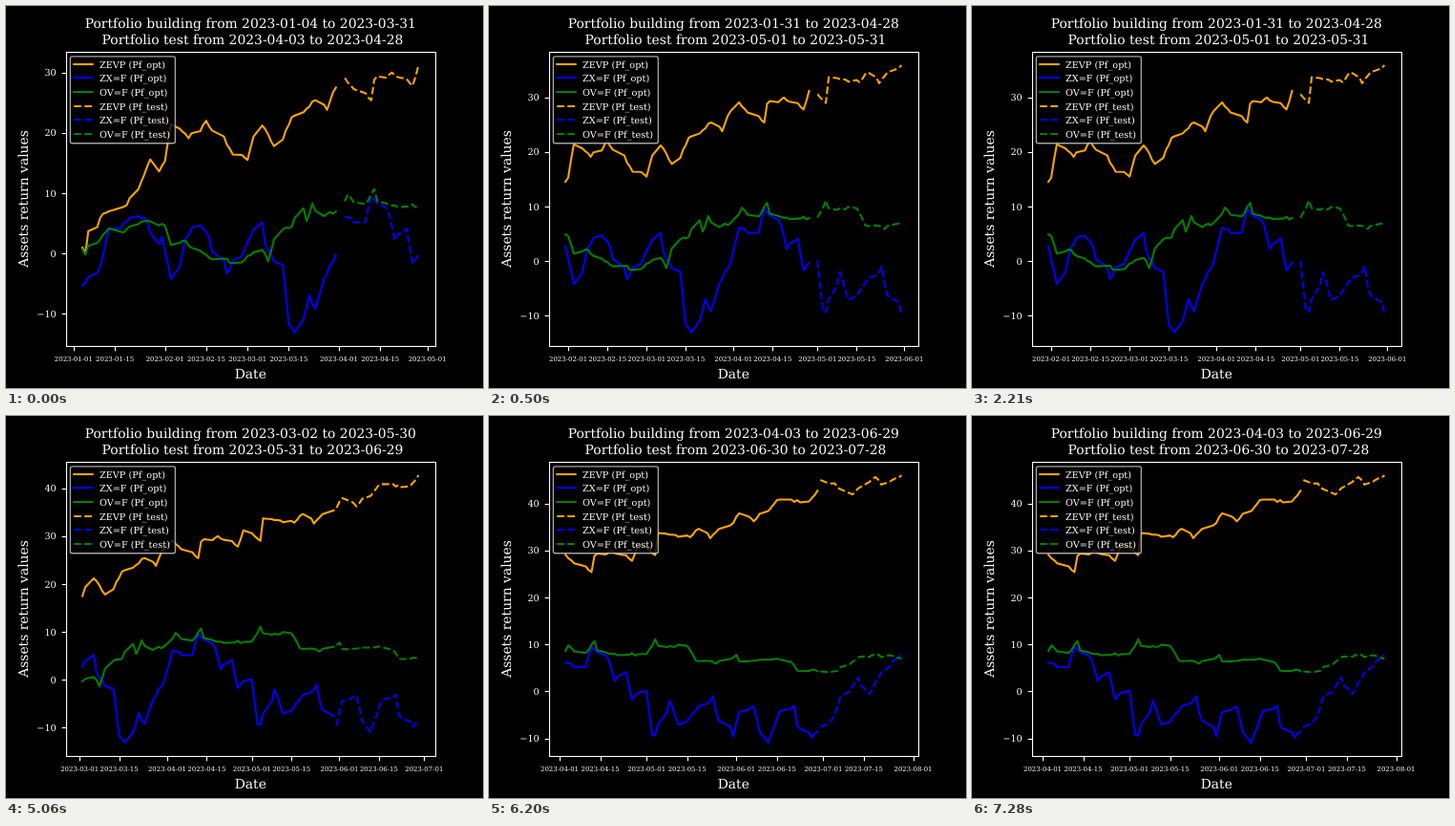
Animation of 500 by 400 pixels, one loop 8 s. Source, as an HTML page:

```html
<!DOCTYPE html>
<html lang="en">
<head>
<meta charset="utf-8">
<title>Portfolio windows</title>
<style>
  html, body { margin: 0; width: 100%; height: 100%; overflow: hidden; background: #000; }
  svg { display: block; width: 500px; height: 400px; }
  text { fill: #fff; font-family: 'DejaVu Serif', 'Noto Serif', serif; white-space: pre; text-rendering: geometricPrecision; }
</style>
</head>
<body>
<svg id="stage" viewBox="0 0 500 400"></svg>
<script>
const DAY = 86400000;
const LOOP = 8000;
const BOX = { left: 62.5, right: 450, top: 48, bottom: 356 };
const CLOSED = ['2023-01-16', '2023-02-20', '2023-04-07', '2023-05-29', '2023-06-19', '2023-07-04'];

// Turning points: [trading day, return in percent]
const ASSETS = [
  { name: 'ZEVP', color: '#ffa500', turns: [
    [0, 1], [1, 0], [2, 3.7], [5, 6.6], [10, 8], [16, 15.6], [17, 13.6], [19, 15.3], [21, 21.4], [25, 19.1],
    [29, 22], [35, 16.4], [38, 15.5], [41, 21.2], [45, 17.8], [49, 22.6], [55, 25.4], [57, 23.8], [61, 29.1],
    [67, 25.4], [68, 28.8], [72, 30], [77, 27.8], [79, 31.2], [83, 29], [84, 33.7], [91, 32.8], [94, 34.6],
    [96, 32.6], [101, 35.9], [103, 37.9], [106, 36.2], [112, 40.7], [118, 40.4], [121, 42.7], [122, 45],
    [128, 41.9], [134, 45.6], [136, 44], [141, 46]] },
  { name: 'ZX=F', color: '#0000ff', turns: [
    [0, -5.3], [4, -2.2], [7, 4], [12, 6.2], [15, 5.5], [17, 1.6], [18, 2.8], [21, -4.2], [24, 2.6], [27, 4.7],
    [30, 2.6], [33, -3.3], [36, -.5], [41, 5.2], [42, 1.6], [46, -1.9], [48, -11.7], [50, -13.1], [53, -6.9],
    [55, -9.2], [56, -4.1], [60, -.2], [61, 6.1], [65, 5.2], [67, 9.5], [71, 6.6], [73, 2.2], [75, 4.1],
    [77, -1.7], [80, .1], [82, -9.3], [83, -9.3], [86, -2], [89, -7.1], [97, -1], [98, -4.4], [101, -9.6],
    [103, -4.4], [106, -3.3], [109, -10.9], [113, -4.2], [115, -3.1], [116, -7.3], [119, -9.8], [123, -6.8],
    [126, -1.1], [130, 3], [132, -.6], [138, 6.5], [141, 7.7]] },
  { name: 'OV=F', color: '#008000', turns: [
    [0, .7], [1, -.2], [2, 1.3], [7, 4.2], [9, 3.5], [14, 5.4], [19, 4.6], [21, 1.4], [24, 2.1], [29, -.2],
    [35, -1.6], [41, .6], [43, -1.3], [46, 4], [49, 4.4], [51, 7.5], [52, 5.4], [54, 8.3], [56, 6.2],
    [60, 7], [62, 9.8], [65, 8.2], [68, 10.7], [69, 8.7], [74, 7.7], [80, 8], [83, 11.1], [84, 9.7],
    [90, 9.7], [93, 6.6], [98, 5.9], [102, 7.8], [103, 6.4], [113, 6.8], [116, 4.4], [121, 4.3],
    [125, 4.4], [129, 6.7], [133, 7.8], [139, 7.3], [141, 6.9]] }
];

const WINDOWS = [
  { at: 0, from: '2023-01-04', split: '2023-04-03', to: '2023-04-28' },
  { at: 500, from: '2023-01-31', split: '2023-05-01', to: '2023-05-31' },
  { at: 3350, from: '2023-03-02', split: '2023-05-31', to: '2023-06-29' },
  { at: 6200, from: '2023-04-03', split: '2023-06-30', to: '2023-07-28' }
];

const iso = ms => new Date(ms).toISOString().slice(0, 10);

function tradingDays(first, last) {
  const days = [];
  for (let d = Date.parse(first); d <= Date.parse(last); d += DAY) {
    const weekday = new Date(d).getUTCDay();
    if (weekday % 6 && !CLOSED.includes(iso(d))) days.push(iso(d));
  }
  return days;
}

let seed = 7;
const random = () => (seed = seed * 16807 % 2147483647) / 2147483647;

// Straight runs between turning points, with a little daily noise
function walk(turns) {
  const out = [turns[0][1]];
  for (let k = 1; k < turns.length; k++) {
    const [a, va] = turns[k - 1], [b, vb] = turns[k];
    for (let i = a + 1; i < b; i++) out.push(va + (vb - va) * (i - a) / (b - a) + (random() - .5) * .6);
    out.push(vb);
  }
  return out;
}

const days = tradingDays('2023-01-04', '2023-07-28');
ASSETS.forEach(a => a.returns = walk(a.turns));

const text = (s, x, y, size, anchor = 'middle', extra = '') =>
  `<text x="${x}" y="${y}" font-size="${size}" text-anchor="${anchor}" ${extra}>${s}</text>`;

const line = (d, color, dashed) =>
  `<path d="${d}" fill="none" stroke="${color}" stroke-width="2.08" stroke-linejoin="round" ` +
  (dashed ? 'stroke-dasharray="7.71 3.33"/>' : 'stroke-linecap="square"/>');

const tick = d => `<path d="${d}" stroke="#fff" stroke-width="1.11"/>`;

function legend() {
  let out = '<rect x="67.4" y="52.9" width="110" height="90.8" rx="2" fill="#000" fill-opacity=".8" ' +
    'stroke="#ccc" stroke-opacity=".8" stroke-width="1.39"/>';
  ['opt', 'test'].forEach((part, p) => ASSETS.forEach((a, i) => {
    const y = 60.6 + 14.65 * (p * 3 + i);
    out += line(`M71.2 ${Math.round(y)}H90.7`, a.color, p) +
      text(`${a.name} (Pf_${part})`, 98, Math.round(y + 4), 9.72, 'start');
  }));
  return out;
}

function chart({ from, split, to }) {
  const [i0, i1, i2] = [from, split, to].map(d => days.indexOf(d));
  const values = ASSETS.flatMap(a => a.returns.slice(i0, i2 + 1));
  const min = Math.min(...values), max = Math.max(...values);
  const t0 = Date.parse(from), t1 = Date.parse(to);
  const padX = (BOX.right - BOX.left) / 22, padY = (BOX.bottom - BOX.top) / 22;
  const px = t => BOX.left + padX + (t - t0) / (t1 - t0) * padX * 20;
  const py = v => BOX.bottom - padY - (v - min) / (max - min) * padY * 20;
  const trace = (a, s, e) => 'M' + a.returns.slice(s, e)
    .map((v, k) => px(Date.parse(days[s + k])).toFixed(2) + ' ' + py(v).toFixed(2)).join('L');

  let out = '';
  ASSETS.forEach(a => out += line(trace(a, i0, i1), a.color));
  ASSETS.forEach(a => out += line(trace(a, i1, i2 + 1), a.color, true));

  for (let m = 0; m < 8; m++) for (const day of [1, 15]) {
    const t = Date.UTC(2023, m, day), x = px(t);
    if (x < BOX.left || x > BOX.right) continue;
    out += tick(`M${Math.round(x) + .5} 356.5v4.9`) + text(iso(t), x.toFixed(2), 372, 6.94);
  }
  for (let v = -20; v <= 50; v += 10) {
    const y = py(v);
    if (y < BOX.top || y > BOX.bottom) continue;
    out += tick(`M63.5 ${Math.round(y) + .5}h-4.9`) +
      text(String(v).replace('-', '\u2212'), 52.8, Math.round(y + 3.6), 9.72, 'end');
  }

  return out +
    '<rect x="63.5" y="48.5" width="387" height="308" fill="none" stroke="#fff" stroke-width="1.11"/>' +
    text(`Portfolio building from ${from} to ${days[i1 - 1]}`, 256.25, 23, 13.89) +
    text(`\u00a0Portfolio test from ${split} to ${to}`, 256.25, 40, 13.89) +
    text('Date', 256.25, 390, 13.89) +
    text('Assets return values', 0, 0, 13.89, 'middle', 'transform="translate(23 202) rotate(-90)"') +
    legend();
}

const stage = document.getElementById('stage');
const views = WINDOWS.map(chart);
let shown = -1;

function render(ms) {
  const t = ms % LOOP;
  const k = WINDOWS.filter(w => w.at <= t).length - 1;
  if (k !== shown) stage.innerHTML = views[shown = k];
}

const start = performance.now();
function loop() {
  render(performance.now() - start);
  requestAnimationFrame(loop);
}
loop();
</script>
</body>
</html>
```
